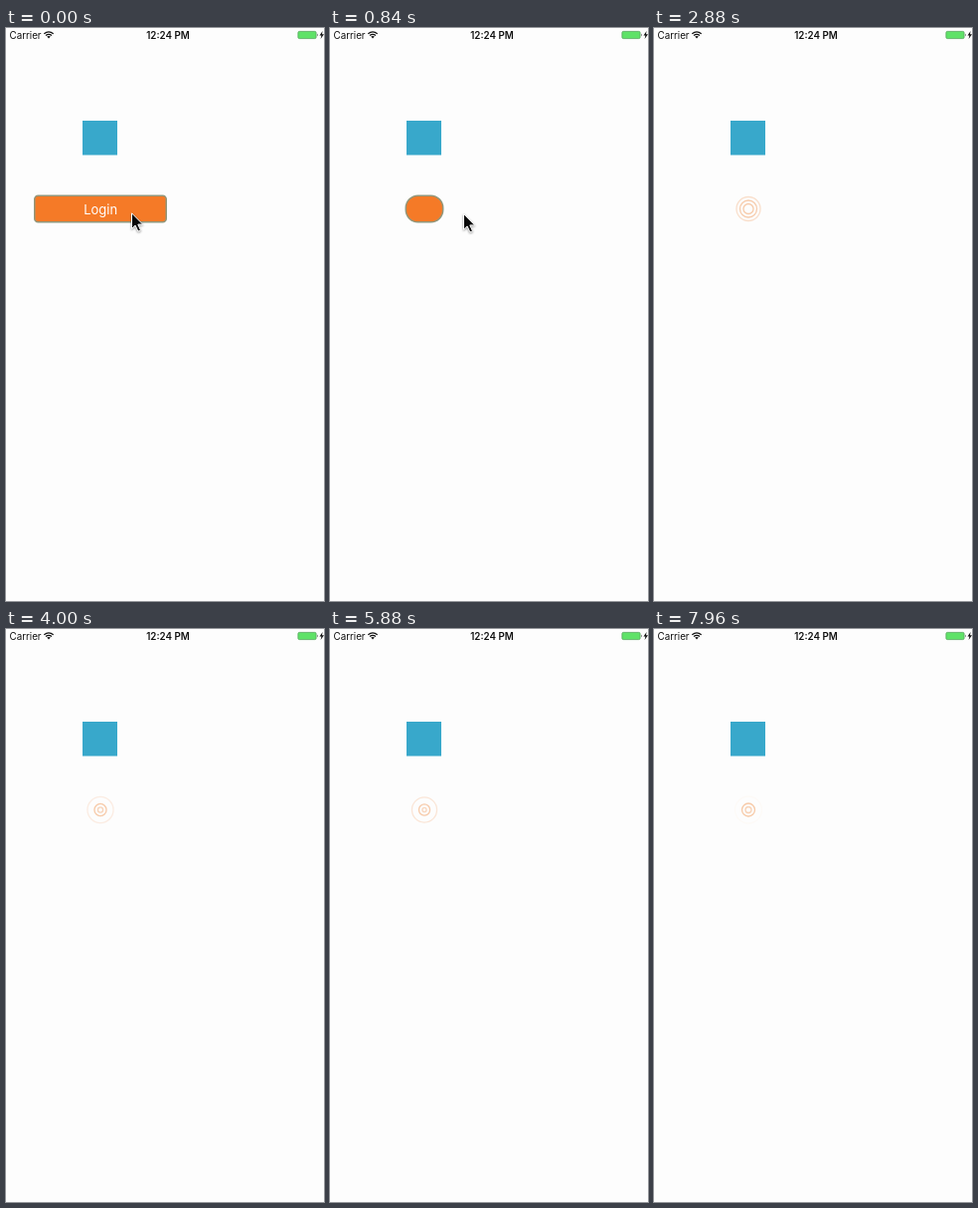
An HTML page that plays this animation: 320 px wide and 575 px high, repeating every 8 s.

```html
<!DOCTYPE html>
<html lang="en">
<head>
<meta charset="utf-8">
<title>Login button</title>
<style>
  html, body { margin: 0; width: 100%; height: 100%; overflow: hidden; background: #fdfdfd; }
  svg { display: block; width: 320px; height: 575px; }
  text { font-family: Inter, Roboto, sans-serif; }
</style>
</head>
<body>
<svg viewBox="0 0 320 575">
  <rect width="320" height="575" fill="#fdfdfd"/>

  <g fill="#111">
    <text x="3.5" y="10.6" font-size="9.8">Carrier</text>
    <text x="163" y="10.6" font-size="9.8" font-weight="600" text-anchor="middle">12:24 PM</text>
    <path d="M41.2 8.6Q43 7.2 44.8 8.6L43 10.6Z"/>
    <path d="M38.3 5.7Q43 1.9 47.7 5.7M40 7.5Q43 5.1 46 7.5" fill="none" stroke="#111" stroke-width="1.3"/>
    <rect x="293.9" y="3.4" width="18.2" height="7.2" rx="1.3" fill="#5fe268" stroke="#55a65c" stroke-width=".8"/>
    <path d="M313 5.5Q314.3 7 313 8.5Z"/>
    <path d="M318.6 3L315.5 7.4H317.4L316.6 11L320 6.2H318Z"/>
  </g>

  <rect x="77" y="93" width="35" height="34.5" fill="#38a8cb"/>

  <g id="rings" fill="none" stroke="#ee8232" stroke-width="1.3"></g>
  <rect id="button" y="168.25" height="26.5" fill="#f57a27" stroke="#91967a" stroke-width="1.5"/>
  <text id="label" x="95.2" y="186.6" font-size="13" fill="#fff" text-anchor="middle">Login</text>
  <path id="cursor" d="M0 0V15.6L3.6 12.3L6.4 18.3L9 17.2L6.3 11.3H11.2Z" fill="#080808" stroke="#fff" stroke-width="1"
        style="filter: drop-shadow(0 1px 1px #0006)"/>
</svg>
<script>
const LOOP = 8000;
const CENTER = { x: 95, y: 181.5 };
const SHRINK_START = 260, RIPPLE_START = 1139;
const RIPPLE_PERIOD = 1950, RIPPLE_RADIUS = 14, RING_COUNT = 3;
const CURSOR_EXIT = 1500;

const $ = id => document.getElementById(id);
const clamp = v => Math.min(1, Math.max(0, v));
const mix = (a, b, k) => a + (b - a) * k;
const span = (t, from, to) => clamp((t - from) / (to - from));
const smooth = k => k * k * (3 - 2 * k);
const set = (el, attrs) => {
  for (const name in attrs) el.setAttribute(name, attrs[name]);
};

const button = $('button'), label = $('label'), cursor = $('cursor');
const rings = Array.from({ length: RING_COUNT }, () => {
  const ring = document.createElementNS('http://www.w3.org/2000/svg', 'circle');
  set(ring, { cx: CENTER.x, cy: CENTER.y });
  return $('rings').appendChild(ring);
});

function drawButton(t) {
  const k = 1 - (1 - span(t, SHRINK_START, RIPPLE_START)) ** 2.1;
  const width = mix(132.5, 26.5, k);
  set(button, {
    x: CENTER.x - width / 2,
    width,
    rx: mix(3.5, 13.25, k),
    opacity: t < RIPPLE_START ? 1 : 0
  });
  set(label, { opacity: 1 - span(t, SHRINK_START, SHRINK_START + 100) });
}

function drawRings(t) {
  rings.forEach((ring, i) => {
    const cycles = (t - RIPPLE_START) / RIPPLE_PERIOD - i / 4;
    const phase = cycles < 0 ? 0 : cycles % 1;
    set(ring, {
      r: Math.max(0, RIPPLE_RADIUS * phase - 0.5),
      opacity: 0.42 * Math.sqrt(Math.sin(Math.PI * phase))
    });
  });
}

function drawCursor(t) {
  const drift = smooth(span(t, 450, 840));
  const exit = span(t, 840, CURSOR_EXIT) ** 1.5;
  const x = 126.5 + 8 * drift + 99 * exit;
  const y = 185.8 + 0.8 * drift + 33 * exit;
  set(cursor, { transform: `translate(${x} ${y})`, opacity: t < CURSOR_EXIT ? 1 : 0 });
}

const start = performance.now();
function frame() {
  const t = (performance.now() - start) % LOOP;
  drawButton(t);
  drawRings(t);
  drawCursor(t);
  requestAnimationFrame(frame);
}
frame();
</script>
</body>
</html>
```
